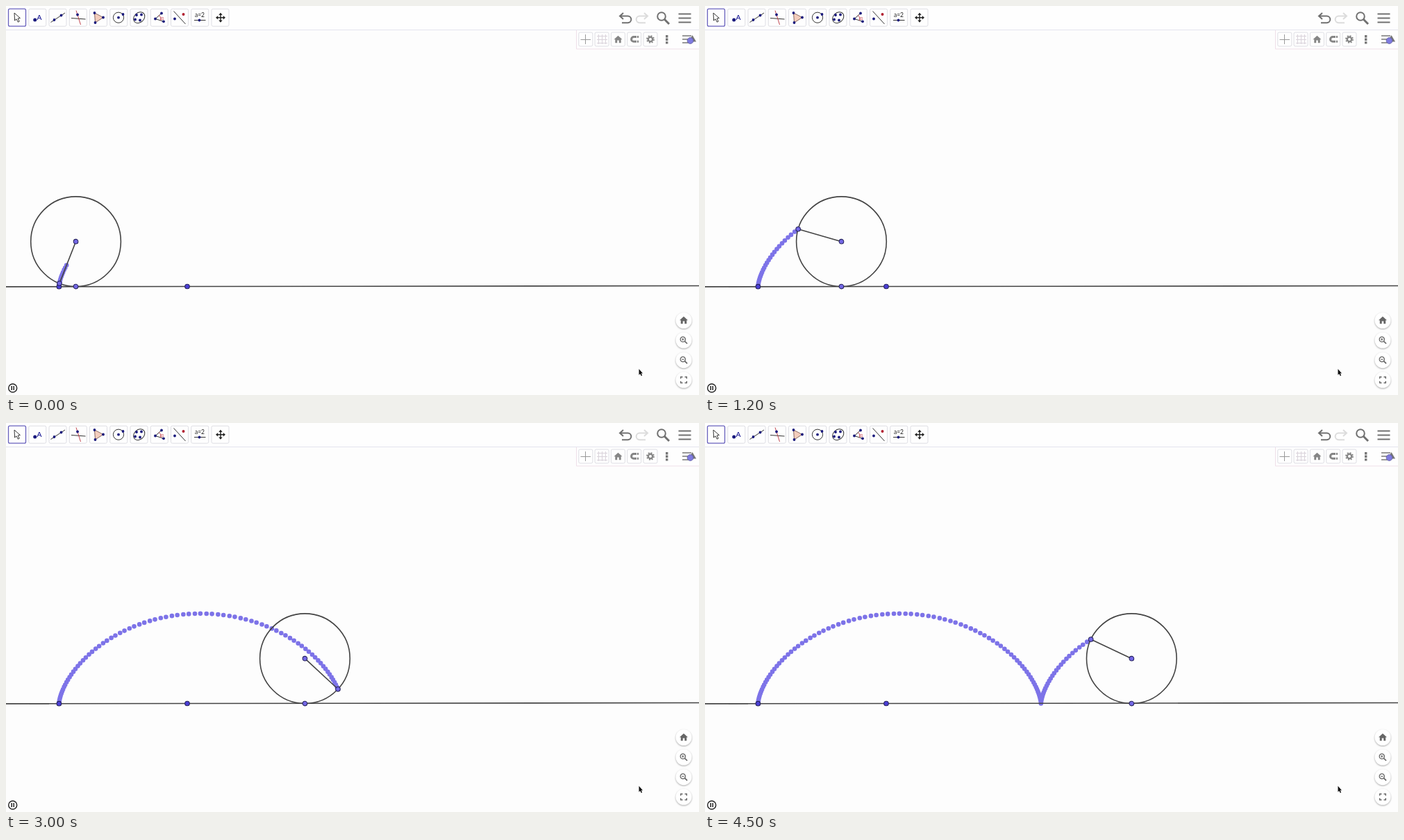
An HTML page that plays this animation: 998 px wide and 561 px high, repeating every 4600 ms.

```html
<!DOCTYPE html>
<html lang="en">
<head>
<meta charset="utf-8">
<title>Rolling circle</title>
<style>
  html, body { margin: 0; width: 100%; height: 100%; overflow: hidden; background: #fdfdfd; }
  svg { display: block; width: 998px; height: 561px; font-family: Lato, "Open Sans", sans-serif; }
  .line { fill: none; stroke: #444; stroke-width: 1.6; }
  .thin { fill: none; stroke: #333; stroke-width: 1; }
  .red { stroke: #c0454f; }
  .tool { fill: #fefefe; stroke: #dedee4; }
  .tool.on { stroke: #6860bd; stroke-width: 1.3; }
  .dot { fill: #18187c; }
  .grey { fill: none; stroke: #707070; stroke-width: 2; }
  .pale { stroke: #dcdcdc; }
  .solid { fill: #858585; }
  .round { fill: #fff; filter: drop-shadow(0 1px 1.2px #0005); }
  .pt { fill: #7468e6; stroke: #29265f; stroke-width: 1.1; }
  .fixed { fill: #4b3fd6; }
  #trace { fill: none; stroke: #7d73e8; stroke-width: 6.6; stroke-linecap: round; }
</style>
</head>
<body>
<svg viewBox="0 0 998 561">
  <defs>
    <path id="home" d="M0-5.5 6 0H4.2V5H1.3V1.3H-1.3V5H-4.2V0H-6Z"/>
    <g id="lens" fill="none" stroke="#666" stroke-width="1.3">
      <circle cx="-1.2" cy="-1.2" r="3.6"/><path d="M1.5 1.5 5 5" stroke-width="1.7"/>
    </g>
    <path id="undo" d="M889 10 884 14.5 889 19M884.5 14.5H895.5A4.8 4.8 0 0 1 895.5 24.2H887"/>
  </defs>

  <!-- drawing area -->
  <path id="trace"/>
  <path class="line" d="M0 404.9 998 403.5"/>
  <g id="wheel">
    <circle class="line" cy="339.7" r="64.85"/>
    <path class="line" id="spoke"/>
  </g>
  <circle class="pt fixed" cx="76.4" cy="404.7" r="3.3"/>
  <circle class="pt fixed" cx="261" cy="404.5" r="3.3"/>
  <g id="points">
    <circle class="pt" cy="339.7" r="3.3"/>
    <circle class="pt" cy="404.6" r="3.3"/>
    <circle class="pt" id="pen" r="3.3"/>
  </g>

  <!-- toolbar -->
  <path d="M0 0H998V34H0Z" fill="#fefefe"/>
  <path d="M0 34.5H998" stroke="#e4e4ee"/>
  <g id="tools"></g>
  <path d="M12 10 12.6 21 15 18.8 17.3 23.2 19.2 22.2 17.1 18 20.4 17.5Z" fill="#fff" stroke="#333"/>
  <circle class="dot" cx="41.7" cy="20" r="2.5"/>
  <text x="44.6" y="19.5" font-size="10" font-weight="700" fill="#2a2a9c">A</text>
  <path class="thin" d="M64.5 23.5 85 10"/>
  <path class="thin" d="M94 17.5 114.5 19"/>
  <path class="thin red" d="M101 6.5 107.5 27"/>
  <path d="M127.5 10 140 16.5 128.5 24Z" fill="#f3cdbd" stroke="#8b6a62"/>
  <circle class="thin" cx="162" cy="16.7" r="7.6"/>
  <ellipse class="thin" cx="191.7" cy="16.7" rx="9" ry="7" transform="rotate(-42 191.7 16.7)"/>
  <path class="thin" d="M224 10.5 215 18.5 227 22.3"/>
  <path class="thin red" d="M220 13.5Q224 16 222.5 21"/>
  <text x="222.5" y="19.5" font-size="8" fill="#d0505a">α</text>
  <path class="thin" d="M241.5 7.5 258.5 26"/>
  <circle cx="255.5" cy="12" r="2" fill="#b22233"/>
  <text x="279" y="16" font-size="8.5" text-anchor="middle" fill="#222">a=2</text>
  <path class="thin" d="M271 20.5H287.5"/>
  <g id="dots" class="dot"></g>
  <path d="M303 16.7H315M309 10.7V22.7" stroke="#222" stroke-width="1.4"/>
  <path d="M309 9.7 311.7 13H306.3ZM309 23.7 306.3 20.4H311.7ZM302 16.7 305.3 14V19.4ZM316 16.7 312.7 19.4V14Z" fill="#222"/>

  <use href="#undo" class="grey"/>
  <use href="#undo" class="grey pale" transform="matrix(-1 0 0 1 1808 0)"/>
  <g class="grey" stroke="#606060">
    <circle cx="944" cy="15" r="5.8"/>
    <path d="M948.3 19.3 955 26" stroke-width="3"/>
    <path d="M968.5 11.5H986.5M968.5 17.5H986.5M968.5 23.5H986.5"/>
  </g>

  <!-- view options -->
  <path d="M998 35H821V62H998Z" fill="#fefefe"/>
  <path d="M821.5 35V62H998" fill="none" stroke="#efdfe8"/>
  <g id="options"></g>
  <path d="M834.5 41V55M827.5 48.5H842" stroke="#999" fill="none"/>
  <path d="M853.5 41V55M858.5 41V55M863.5 41V55M851 43.5H866M851 48.5H866M851 53.5H866" stroke="#d9d2da" fill="none"/>
  <use href="#home" class="solid" x="881.5" y="48.3"/>
  <path d="M911 44.5H904A3.4 3.4 0 0 0 904 51.3H911" fill="none" stroke="#858585" stroke-width="3"/>
  <path d="M908.5 42.5V53.5" stroke="#fefefe"/>
  <circle cx="928" cy="48" r="3.2" fill="none" stroke="#858585" stroke-width="2.4"/>
  <circle cx="928" cy="48" r="5" fill="none" stroke="#858585" stroke-width="1.8" stroke-dasharray="1.96"/>
  <path d="M950 42h3.4v3.4h-3.4ZM950 46.6h3.4v3.4h-3.4ZM950 51.2h3.4v3.4h-3.4Z" fill="#777"/>
  <path d="M974 43H987M974 48H983M974 53H983" stroke="#777" stroke-width="1.4"/>
  <path d="M988.5 42 994 51.5H983Z" fill="#777"/>
  <circle cx="985.5" cy="50" r="4.4" fill="#7f7be0" stroke="#5c5a9c" stroke-width=".8"/>

  <!-- zoom buttons -->
  <g id="rounds"></g>
  <use href="#home" x="976" y="453.3" fill="#666"/>
  <use href="#lens" x="976" y="482"/>
  <use href="#lens" x="976" y="510.7"/>
  <path d="M973 480.8H976.6M974.8 479V482.6M973 509.5H976.6" stroke="#666"/>
  <path d="M971.7 537.5V535H974.5M977.5 535H980.3V537.5M980.3 541V543.5H977.5M974.5 543.5H971.7V541" fill="none" stroke="#666" stroke-width="1.4"/>

  <circle cx="9.7" cy="551" r="6" fill="#fff" stroke="#222" stroke-width="1.4"/>
  <path d="M8.2 548V554M11.2 548V554" stroke="#222" stroke-width="1.5"/>
  <path d="M911.5 523.5V532L913.3 530.4 914.8 533.4 916.2 532.7 914.7 529.8H917Z" fill="#111"/>
</svg>

<script>
const $ = id => document.getElementById(id);

// Static rows of buttons and dots
const button = (x, y, size, cls = "") =>
  `<rect class="tool ${cls}" x="${x - size / 2}" y="${y - size / 2}" width="${size}" height="${size}" rx="2"/>`;
$("tools").innerHTML = Array.from({ length: 11 }, (_, i) =>
  button(16 + i * 29.25, 16.7, 25, i ? "" : "on")).join("");
$("options").innerHTML = Array.from({ length: 5 }, (_, i) =>
  button(834.8 + i * 23.3, 48, 20)).join("");
$("rounds").innerHTML = [453.5, 482, 510.7, 539.3].map(y =>
  `<circle class="round" cx="976" cy="${y}" r="11.5"/>`).join("");
$("dots").innerHTML = [
  [69.5, 20], [79.5, 13.5], [103, 12.5], [127.5, 10], [140, 16.5], [128.5, 24],
  [162, 16.7], [168.5, 12], [186, 19.5], [188, 13], [195, 12.5], [193, 20.5],
  [224, 10.5], [215, 18.5], [227, 22.3], [243, 18.5], [278.5, 20.5]
].map(([x, y]) => `<circle cx="${x}" cy="${y}" r="1.9"/>`).join("");

const LOOP = 4600, TICK = 100;
const R = 64.85, START = 76.4, AXLE = 339.7;
const FIRST = -17, SEEN = -1; // first trace step, last step already traced at the loop start

// [tick, trace step]: the wheel rolls back to its start, then forward
const KEYS = [[0, -11], [2, FIRST], [8, 0], [12, 12], [19, 34], [30, 68], [38, 91], [45, 112]];

function stepAt(tick) {
  const i = Math.max(1, KEYS.findIndex(k => k[0] >= tick));
  const [t0, n0] = KEYS[i - 1], [t1, n1] = KEYS[i];
  return Math.round(n0 + (n1 - n0) * (tick - t0) / (t1 - t0));
}

// Steps alternate between a long and a short advance
const axleX = n => Math.max(START, 146.3 + 8.358 * Math.floor(n / 2) + (n & 1 ? 4.4 : 0));

function penAt(cx) {
  const a = (cx - START) / R;
  return [cx - R * Math.sin(a), AXLE + R * Math.cos(a)];
}

function draw(tick) {
  const n = stepAt(tick), cx = axleX(n), [px, py] = penAt(cx);
  const from = tick < 2 ? n : FIRST;
  let d = "";
  for (let i = from; i <= Math.max(n, SEEN); i++) {
    const [x, y] = penAt(axleX(i));
    d += `M${x.toFixed(2)} ${y.toFixed(2)}h0`;
  }
  $("trace").setAttribute("d", d);
  for (const id of ["wheel", "points"]) $(id).setAttribute("transform", `translate(${cx} 0)`);
  $("spoke").setAttribute("d", `M0 ${AXLE}L${px - cx} ${py}`);
  $("pen").setAttribute("cx", px - cx);
  $("pen").setAttribute("cy", py);
}

const begin = performance.now();
function frame() {
  draw(Math.floor((performance.now() - begin) % LOOP / TICK));
  requestAnimationFrame(frame);
}
frame();
</script>
</body>
</html>
```
